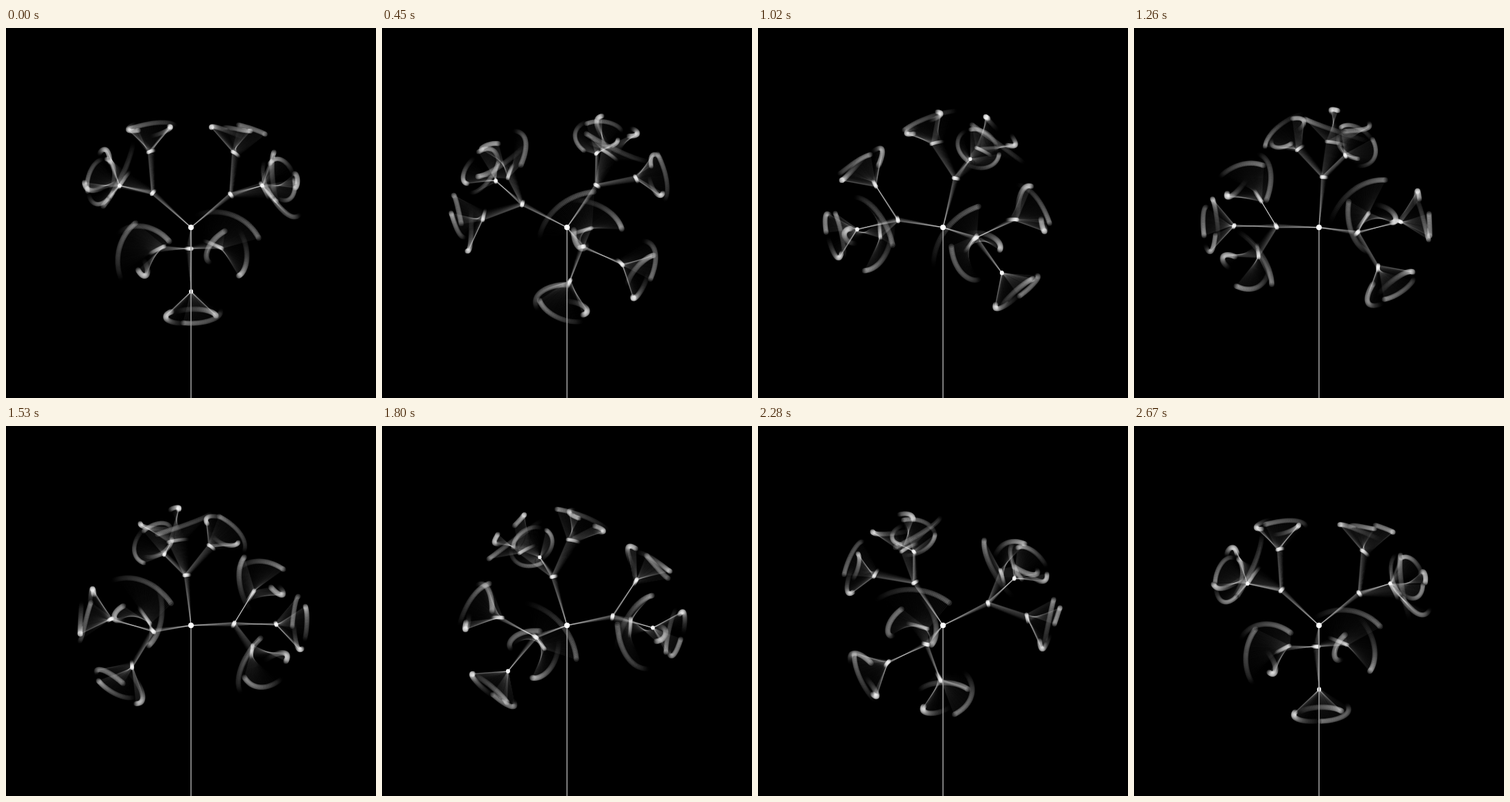
Recreate the animation shown at these times as an HTML page with a canvas. Size 540 px wide and 540 px high, loop 2.7 s.

```html
<!DOCTYPE html>
<html lang="en">
<head>
<meta charset="utf-8">
<title>Spinning tree</title>
<style>
  html, body { margin: 0; width: 100%; height: 100%; overflow: hidden; background: #000; }
  canvas { display: block; }
</style>
</head>
<body>
<canvas id="stage" width="540" height="540"></canvas>
<script>
const ctx = document.getElementById('stage').getContext('2d');
const LOOP = 2700, STEP = 30, LEAD = 25;
const ROOT = { x: 270, y: 291 };
const CAMERA = 900;
const RAD = Math.PI / 180;
const ELEVATION = 52.5 * RAD;

// Each level: branch length, opening angle, start angle, turn per loop, dot radius
const LEVELS = [
  { length: 75, tilt: 60 * RAD, start: 60, turn: -120, dot: 2.7 },
  { length: 60, tilt: 45 * RAD, start: 0, turn: 360, dot: 2.6 },
  { length: 48, tilt: 45 * RAD, start: 0, turn: 1440, dot: 3.5 }
];

// Exposure that fades linearly over the shutter time, in ms
const SHUTTER = 184, INTERVAL = 4, GAIN = 3, LINE_ALPHA = 0.4;

const mix = (a, u, b, v) => u.map((n, i) => a * n + b * v[i]);

// Camera space: x to the right, y up, z toward the viewer
const sinE = Math.sin(ELEVATION), cosE = Math.cos(ELEVATION);
const TRUNK = { u: [0, sinE, -cosE], v: [1, 0, 0], axis: [0, cosE, sinE] };

function project([x, y, z]) {
  const scale = CAMERA / (CAMERA - z);
  return { x: ROOT.x + x * scale, y: ROOT.y - y * scale, scale };
}

function grow(depth, base, frame, phase, lines, dots) {
  const level = LEVELS[depth];
  if (!level) return;
  const from = project(base);
  const sinT = Math.sin(level.tilt), cosT = Math.cos(level.tilt);
  for (let k = 0; k < 3; k++) {
    const angle = (level.start + level.turn * phase + 120 * k) * RAD;
    const c = Math.cos(angle), s = Math.sin(angle);
    const out = mix(c, frame.u, s, frame.v);
    const axis = mix(cosT, frame.axis, sinT, out);
    const tip = mix(1, base, level.length, axis);
    const to = project(tip);
    const radius = level.dot * to.scale;
    lines.moveTo(from.x, from.y);
    lines.lineTo(to.x, to.y);
    dots.moveTo(to.x + radius, to.y);
    dots.arc(to.x, to.y, radius, 0, 2 * Math.PI);
    const next = {
      u: mix(cosT, out, -sinT, frame.axis),
      v: mix(c, frame.v, -s, frame.u),
      axis
    };
    grow(depth + 1, tip, next, phase, lines, dots);
  }
}

function draw(time) {
  ctx.globalAlpha = 1;
  ctx.fillStyle = '#000';
  ctx.fillRect(0, 0, 540, 540);

  ctx.fillStyle = ctx.strokeStyle = '#fff';
  ctx.lineWidth = 1.4;
  for (let age = 0; age < SHUTTER; age += INTERVAL) {
    const weight = GAIN * 2 * INTERVAL / SHUTTER * (1 - age / SHUTTER);
    const lines = new Path2D(), dots = new Path2D();
    grow(0, [0, 0, 0], TRUNK, (time + LEAD - age) / LOOP, lines, dots);
    ctx.globalAlpha = weight * LINE_ALPHA;
    ctx.stroke(lines);
    ctx.globalAlpha = weight;
    ctx.fill(dots);
  }

  ctx.globalAlpha = 1;
  ctx.fillStyle = '#999';
  ctx.fillRect(ROOT.x - 0.8, ROOT.y, 1.6, 540 - ROOT.y);
  ctx.fillStyle = '#fff';
  ctx.beginPath();
  ctx.arc(ROOT.x, ROOT.y, 4, 0, 2 * Math.PI);
  ctx.fill();
}

function tick() {
  const time = performance.now() % LOOP;
  draw(Math.floor(time / STEP) * STEP);
  requestAnimationFrame(tick);
}
tick();
</script>
</body>
</html>
```
